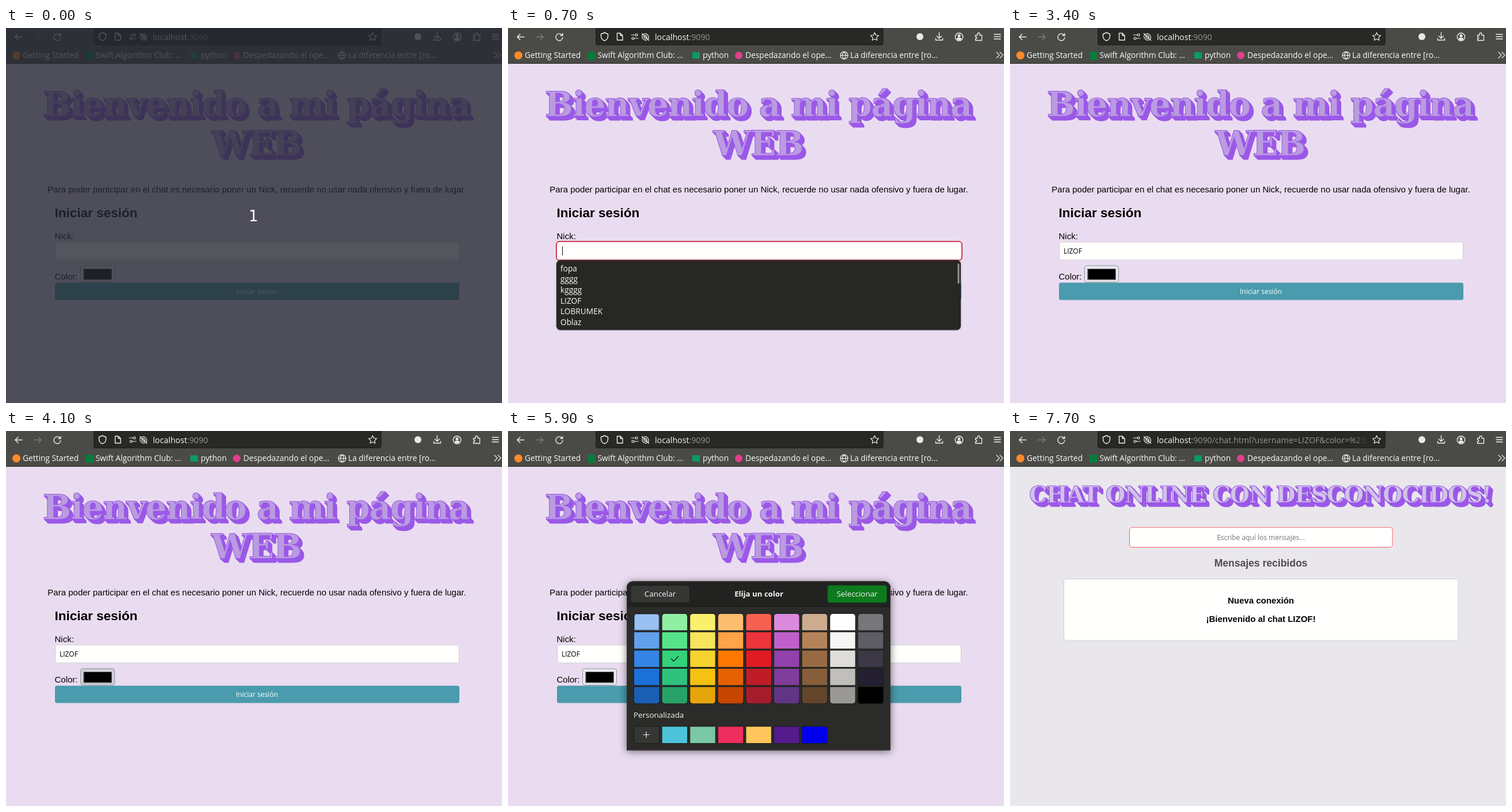
Recreate the animation shown at these times as an HTML page with a canvas. Size 861 by 650 pixels, loop 8 s.

```html
<!DOCTYPE html>
<html lang="es">
<head>
<meta charset="utf-8">
<title>Chat</title>
<style>
  html, body { margin: 0; width: 100%; height: 100%; overflow: hidden; background: #eadcf0; }
  canvas { display: block; width: 861px; height: 650px; }
</style>
</head>
<body>
<canvas id="stage" width="861" height="650"></canvas>
<script>
const ctx = document.getElementById('stage').getContext('2d');
const LOOP = 8000, STEP = 100, MID = 435.5;
const UI = '"Open Sans", "Noto Sans", sans-serif';
const PAGE = '"Liberation Sans", Arial, sans-serif';
const SERIF = '"DejaVu Serif", serif';
const NICK = 'LIZOF';
const ALL_NICKS = ['fopa', 'gggg', 'kgggg', NICK, 'LOBRUMEK', 'Oblaz'];
const PALETTE = [
  '99c1f1 62a0ea 3584e4 1c71d8 1a5fb4', '8ff0a4 57e389 33d17a 2ec27e 26a269',
  'f9f06b f8e45c f6d32d f5c211 e5a50a', 'ffbe6f ffa348 ff7800 e66100 c64600',
  'f66151 ed333b e01b24 c01c28 a51d2d', 'dc8add c061cb 9141ac 813d9c 613583',
  'cdab8f b5835a 986a44 865e3c 63452c', 'ffffff f6f5f4 deddda c0bfbc 9a9996',
  '77767b 5e5c64 3d3846 241f31 000000'
].map(column => column.split(' '));
const CUSTOM = ['4cc3d9', '7bc8a4', 'ef2d5e', 'ffc65d', '551a8b', '0000ee'];

const clamp = v => Math.max(0, Math.min(1, v));
const within = (t, from, to) => t >= from && t < to;

function text(str, x, y, font, color, align = 'left') {
  ctx.font = font;
  ctx.fillStyle = color;
  ctx.textAlign = align;
  ctx.fillText(str, x, y);
}

function box(x, y, w, h, radius, fill, border, line = 1) {
  ctx.beginPath();
  ctx.roundRect(x, y, w, h, radius);
  if (fill) { ctx.fillStyle = fill; ctx.fill(); }
  if (border) {
    ctx.beginPath();
    ctx.roundRect(x + line / 2, y + line / 2, w - line, h - line, radius);
    ctx.strokeStyle = border;
    ctx.lineWidth = line;
    ctx.stroke();
  }
}

function dot(x, y, r, color) {
  ctx.beginPath();
  ctx.arc(x, y, r, 0, 7);
  ctx.fillStyle = color;
  ctx.fill();
}

// Line icon whose path is relative to its centre.
function icon(x, y, path, color = '#f0f0ee', line = 1.4) {
  ctx.save();
  ctx.translate(x, y);
  ctx.strokeStyle = color;
  ctx.lineWidth = line;
  ctx.lineCap = ctx.lineJoin = 'round';
  ctx.stroke(new Path2D(path));
  ctx.restore();
}

// Tightly spaced heading with an outline and a diagonal extrusion.
function title(str, y, size, fill) {
  const x = MID - 1.5, font = `bold ${size}px ${SERIF}`;
  ctx.save();
  ctx.letterSpacing = '-1.75px';
  ctx.lineJoin = 'round';
  ctx.strokeStyle = '#9b59e8';
  ctx.lineWidth = 1;
  for (let d = 6.6; d > -0.1; d -= 0.6) {
    text(str, x + d, y + d, font, d > 0.1 ? '#9b59e8' : fill, 'center');
    ctx.strokeText(str, x + d, y + d);
  }
  ctx.restore();
}

function drawAddress(inChat) {
  box(152, -4, 499.5, 34, 4, '#282826', '#1d1d1c');
  ctx.save();
  ctx.beginPath();
  ctx.rect(250, 0, 372, 30);
  ctx.clip();
  const font = `14.2px ${UI}`;
  text('localhost', 255, 20.5, font, '#f8f8f6');
  const x = 255 + ctx.measureText('localhost').width;
  const path = inChat ? `/chat.html?username=${NICK}&color=%2333d17a` : '';
  text(':9090' + path, x, 20.5, font, '#969694');
  if (inChat) {
    const fade = ctx.createLinearGradient(594, 0, 622, 0);
    fade.addColorStop(0, 'rgba(40,40,38,0)');
    fade.addColorStop(1, '#282826');
    ctx.fillStyle = fade;
    ctx.fillRect(594, 2, 28, 26);
  }
  ctx.restore();
}

function drawBrowser(inChat) {
  ctx.fillStyle = '#4a4a47';
  ctx.fillRect(0, 0, 861, 62);
  ctx.fillStyle = '#2c2c2a';
  ctx.fillRect(0, 61, 861, 1);
  drawAddress(inChat);

  icon(22, 15.5, 'M6 0H-6M-1 -5L-6 0L-1 5');
  icon(55, 15.5, 'M-6 0H6M1 -5L6 0L1 5', '#7d7d7a');
  icon(89, 15.5, 'M5 -3A6 6 0 1 0 6 1M6 -6V-2.5H2');
  icon(167.5, 15, 'M0 -7L6 -4.5V-1C6 3 3 6 0 7C-3 6 -6 3 -6 -1V-4.5Z');
  icon(194, 15, 'M-4.5 -6H1L5 -2V6H-4.5ZM1 -6V-2H5');
  icon(220, 15, 'M-6 -3H1M1 -3A2 2 0 1 1 5 -3A2 2 0 1 1 1 -3M6 3H-1M-1 3A2 2 0 1 1 -5 3A2 2 0 1 1 -1 3', '#f0f0ee', 1.2);
  icon(238.5, 15.5, 'M-6 -6L6 6M-3 -5A6.4 6.4 0 0 1 5 4M3 5A6.4 6.4 0 0 1 -5 -4M-1.5 -2.5Q3 -3 2.8 1.5M1.5 2.8Q-3 3 -2.8 -1.2', '#f0f0ee', 1.2);
  icon(636.5, 15, 'M0 -7L2.1 -2.5L7 -2L3.4 1.4L4.3 6.3L0 4L-4.3 6.3L-3.4 1.4L-7 -2L-2.1 -2.5Z', '#f0f0ee', 1.2);
  dot(715, 15, 6, '#e8e8e6');
  icon(748.5, 15, 'M0 -7V3M-4 -1L0 3L4 -1M-6 3V6H6V3');
  icon(783, 15.5, 'M-6.7 0A6.7 6.7 0 1 1 6.7 0A6.7 6.7 0 1 1 -6.7 0');
  dot(783, 13.5, 2.5, '#f0f0ee');
  ctx.beginPath();
  ctx.ellipse(783, 18.7, 4, 2.2, 0, 0, 7);
  ctx.fill();
  icon(817, 15.5, 'M-5.5 -3H-2V-5A2 2 0 0 1 2 -5V-3H5.5V6H-5.5V3H-4A2 2 0 0 0 -4 0H-5.5Z', '#f0f0ee', 1.3);
  icon(849.5, 15, 'M-5.5 -4H5.5M-5.5 0H5.5M-5.5 4H5.5');
  icon(853, 47, 'M-5 -5L0 0L-5 5M1 -5L6 0L1 5', '#e4e4e2', 1.3);

  const font = `13.75px ${UI}`, white = '#fafaf8';
  dot(18, 47.5, 7, '#ff8a2a');
  text('Getting Started', 29, 52.3, font, white);
  ctx.fillStyle = '#0a7a3c';
  ctx.fillRect(138, 41, 14, 14);
  text('Swift Algorithm Club: …', 155.5, 52.3, font, white);
  ctx.fillStyle = '#0a9a66';
  ctx.fillRect(320, 42, 13, 11);
  text('python', 338, 52.3, font, white);
  dot(400.5, 47.5, 6.5, '#e0408c');
  text('Despedazando el ope…', 412, 52.3, font, white);
  icon(583.5, 47.5, 'M-6.5 0A6.5 6.5 0 1 1 6.5 0A6.5 6.5 0 1 1 -6.5 0M-6.5 0H6.5M0 -6.5Q-6 0 0 6.5Q6 0 0 -6.5', white, 1.2);
  text('La diferencia entre [ro…', 594, 52.3, font, white);
}

function typedNick(t) {
  const keys = [1600, 2100, 2300, 2400, 2500];
  return NICK.slice(0, keys.filter(k => t >= k).length);
}

function drawSuggestions(t) {
  const short = t >= 2100;
  const names = t < 1600 ? ALL_NICKS
    : short ? [NICK, 'Lizof'] : [NICK, 'LOBRUMEK', 'Oblaz', 'Lizof'];
  ctx.save();
  ctx.shadowColor = 'rgba(0,0,0,.4)';
  ctx.shadowBlur = 3;
  box(84, 402.5, 702, short ? 46.5 : 121, 7, '#272725');
  ctx.restore();
  const hovered = t < 3000 ? -1 : t < 3100 ? 1 : 0;
  names.forEach((name, i) => {
    const y = 417 + i * 18.65;
    if (i === hovered) box(86, y - 9, 698, 18, 3, '#da3450');
    text(name, 91, y + 4.8, `13.7px ${UI}`, '#f8f8f6');
  });
  if (t < 1700) box(780.5, 408, 3, 35, 1.5, '#92928f');
}

function drawLogin(t) {
  title('Bienvenido a mi página', 153, 59, '#ba9be0');
  title('WEB', 221, 59, '#ba9be0');
  text('Para poder participar en el chat es necesario poner un Nick, recuerde no usar nada ofensivo y fuera de lugar.',
    MID, 285, `15px ${PAGE}`, '#000', 'center');
  text('Iniciar sesión', 84.5, 328, `bold 22.5px ${PAGE}`, '#000');
  text('Nick:', 84.5, 366, `15px ${PAGE}`, '#000');
  text('Color:', 84.5, 436, `15px ${PAGE}`, '#000');

  box(129, 411.5, 60, 29.5, 4, within(t, 4100, 4700) ? '#d0d0d7' : '#e9e9ed', '#8f8f9d');
  box(134.5, 417, 49.5, 19.5, 0, t >= 6500 ? '#33d17a' : '#000', '#84848c');

  const hover = t === 3800 || within(t, 7300, 7600);
  box(85, 441.5, 702, 30, 3.5, hover ? '#3b7d8c' : '#4a9bad');
  text('Iniciar sesión', MID, 461, `12px ${UI}`, '#fff', 'center');

  const focused = within(t, 600, 3400);
  box(85, 370.5, 702, 32, 4, '#fffffd', '#ccc7cf');
  if (focused) box(83, 369, 706, 34.5, 5, '#fffffd', '#cc3950', 2);
  const nick = typedNick(t);
  text(nick, 93, 391, `12px ${UI}`, '#000');
  if (focused && !within(t, 1900, 2100)) {
    ctx.fillStyle = '#000';
    ctx.fillRect(Math.round(93.5 + ctx.measureText(nick).width), 379, 1, 15);
  }
  if (within(t, 700, 3400)) drawSuggestions(t);
}

function drawTick(x, y, color, alpha) {
  ctx.save();
  ctx.globalAlpha *= alpha;
  icon(x, y, 'M-6 0L-2 4L6 -4', color, 1.5);
  ctx.restore();
}

function drawSwatch(col, row, hovered) {
  const x = 219 + col * 48.6, y = 317 + row * 31.7;
  const top = row === 0 ? 4.5 : 0, bottom = row === 4 ? 4.5 : 0;
  const corners = [top, top, bottom, bottom];
  box(x - 1, y - 1, 45.5, 30.5, corners, '#1d1d1c');
  box(x, y, 43.5, 28.5, corners, '#' + PALETTE[col][row]);
  if (hovered) box(x, y, 43.5, 28.5, corners, 'rgba(255,255,255,.18)');
  if (col + row === 0) box(x, y, 43.5, 28.5, 4, null, 'rgba(30,50,80,.55)');
}

function drawPicker(t) {
  const open = t < 5000 ? clamp((t - 4100) / 200) : clamp((6600 - t) / 200);
  if (!open) return;
  ctx.save();
  ctx.globalAlpha = open;
  ctx.translate(0, 407 * (1 - open));
  ctx.scale(1, open);

  ctx.save();
  ctx.shadowColor = 'rgba(0,0,0,.55)';
  ctx.shadowBlur = 14;
  ctx.shadowOffsetY = 2;
  box(206, 260.5, 458, 293, [11, 11, 0, 0], '#2b2b29');
  ctx.restore();
  box(206, 260.5, 458, 44, [11, 11, 0, 0], '#222221');
  ctx.fillStyle = '#191918';
  ctx.fillRect(206, 304, 458, 1);
  box(206, 260.5, 458, 293, [11, 11, 0, 0], null, '#3a3a38');

  const font = `13.4px ${UI}`, white = '#f7f7f5';
  box(212.5, 267, 103.5, 31, 5, '#363635', '#1a1a19');
  text('Cancelar', 264, 287, font, white, 'center');
  text('Elija un color', MID, 287, `bold 13.2px ${UI}`, white, 'center');
  box(554.5, 267, 103.5, 31, 5, t === 6400 ? '#0b5f18' : '#0e7a1e', '#0a4f14');
  text('Seleccionar', 606, 287, font, white, 'center');

  const onGreen = within(t, 4800, 5800), onYellow = t === 5800;
  PALETTE.forEach((column, col) => column.forEach((_, row) =>
    drawSwatch(col, row, (onGreen && col === 1 && row === 2) || (onYellow && col === 2 && row === 1))));
  const moved = clamp((t - 5100) / 400);
  drawTick(629.5, 458, '#fff', 1 - moved);
  drawTick(289.5, 395, '#10251a', moved);

  text('Personalizada', 218, 497, font, white);
  box(218, 511.5, 45, 30.5, [4.5, 0, 0, 4.5], '#363635', '#1a1a19');
  icon(240, 526.5, 'M-5 0H5M0 -5V5', white, 1.2);
  CUSTOM.forEach((color, i) => {
    const x = 267.6 + i * 48.6, r = i === 5 ? 4.5 : 0;
    box(x - 1, 511.5, 45.5, 30.5, [0, r, r, 0], '#1d1d1c');
    box(x, 512.5, 43.5, 28.5, [0, r, r, 0], '#' + color);
  });
  ctx.restore();
}

function drawChat(t) {
  title('CHAT ONLINE CON DESCONOCIDOS!', 124, 39.8, '#d2c2e8');
  box(207, 166.5, 457.5, 35.5, 4.5, '#fffffd', '#f15a60');
  text('Escribe aquí los mensajes...', MID, 189, `12px ${UI}`, '#757575', 'center');
  text('Mensajes recibidos', MID, 235, `bold 17.55px ${PAGE}`, '#504c52', 'center');
  box(93, 256, 685.5, 107.5, 4, '#fffffd', '#cfccd1');
  if (t < 7700) return;
  text('Nueva conexión', MID, 299, `bold 15px ${PAGE}`, '#000', 'center');
  text(`¡Bienvenido al chat ${NICK}!`, MID, 331, `bold 15px ${PAGE}`, '#000', 'center');
}

function drawCountdown() {
  ctx.fillStyle = 'rgba(38,41,50,.79)';
  ctx.fillRect(0, 0, 861, 650);
  text('1', 429.5, 334.5, '26px "DejaVu Sans", sans-serif', '#fff', 'center');
}

function render(t) {
  const inChat = t >= 7600;
  ctx.fillStyle = inChat ? '#e9e7ec' : '#eadcf0';
  ctx.fillRect(0, 0, 861, 650);
  drawBrowser(inChat);
  if (inChat) {
    drawChat(t);
  } else {
    drawLogin(t);
    drawPicker(t);
  }
  if (t < 100) drawCountdown();
}

const start = performance.now();
function frame() {
  const elapsed = (performance.now() - start) % LOOP;
  render(Math.floor(elapsed / STEP) * STEP);
  requestAnimationFrame(frame);
}
frame();
</script>
</body>
</html>
```
